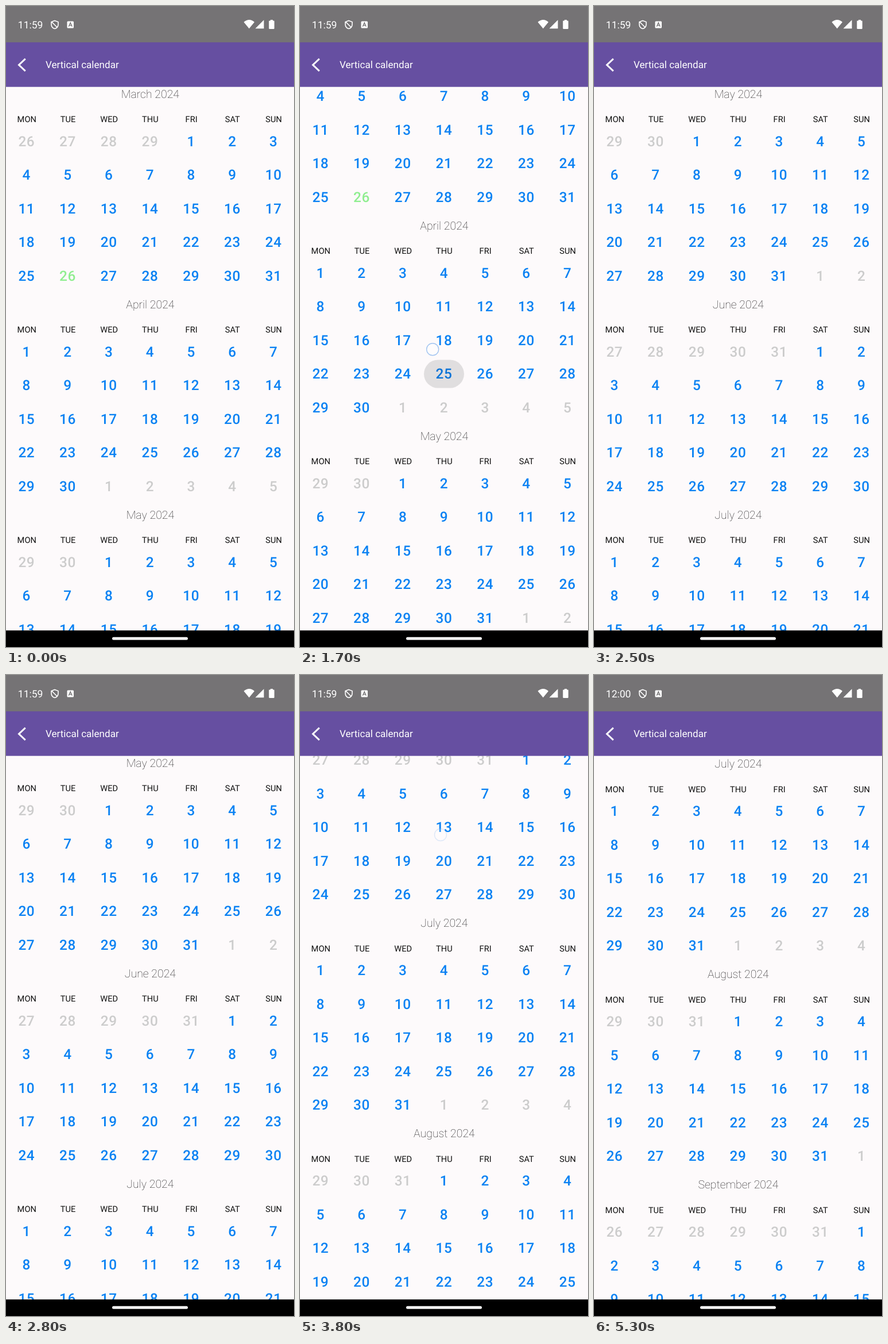
These frames come from a looping animation (502 by 1115 pixels, 6400 ms). An HTML page:

```html
<!DOCTYPE html>
<html lang="en">
<head>
<meta charset="utf-8">
<title>Vertical calendar</title>
<style>
  html, body { margin: 0; width: 100%; height: 100%; overflow: hidden; background: #000; }
  svg { display: block; width: 502px; height: 1115px; }
  text { font-family: Roboto, "Noto Sans", sans-serif; text-rendering: geometricPrecision; }
  #list text { text-anchor: middle; }
  .title { font-size: 19.5px; font-weight: 200; fill: #1c1b1d; }
  .weekday { font-size: 14.64px; fill: #111; }
  .day { font-size: 24.4px; font-weight: 500; letter-spacing: .6px; fill: #0a82f3; }
  .other { fill: #ccc; }
  .today { fill: #90ee90; }
  .label { font-size: 17.08px; fill: #fff; }
  #clock { font-size: 17.5px; font-kerning: none; }
</style>
</head>
<body>
<svg viewBox="0 0 502 1115">
  <rect width="502" height="1115" fill="#fdfafb"/>
  <g id="list">
    <g id="months"></g>
    <rect id="ripple" x="216" y="752.5" width="70" height="49" rx="24.5"/>
  </g>
  <circle id="touch" r="10.5" fill="#fff" fill-opacity=".6" stroke="#9cc1f0" stroke-width="1.4"/>

  <rect width="502" height="64" fill="#757375"/>
  <text id="clock" class="label" x="20.8" y="38.6">11:59</text>
  <g fill="none" stroke="#fff" stroke-width="1.6">
    <path d="M85 25.4 L91 27.7 V32 C91 35.6 88.5 38.6 85 39.6 C81.5 38.6 79 35.6 79 32 V27.7 Z"/>
    <path d="M79.5 27.5 L89.5 37.5"/>
  </g>
  <rect x="106.5" y="26.5" width="11.5" height="12" rx="1.5" fill="#fff"/>
  <path d="M109.3 35.8 L112.25 29 L115.2 35.8 M110.3 33.6 H114.2" fill="none" stroke="#757375" stroke-width="1.4"/>
  <g fill="#fff">
    <path d="M414.5 28 Q424 20 433 28 L423.8 39.3 Z"/>
    <path d="M434.5 39.3 L449.5 24.3 V39.3 Z"/>
    <rect x="461" y="24" width="4" height="3"/>
    <rect x="458.3" y="25.6" width="9.4" height="14.4" rx="1.2"/>
  </g>

  <rect y="63.2" width="502" height="77.5" fill="#664fa1"/>
  <path d="M33.7 91.8 L22.5 102.5 L33.7 113.2" fill="none" stroke="#fff" stroke-width="3"/>
  <text class="label" x="69" y="108">Vertical calendar</text>

  <rect y="1086.2" width="502" height="29" fill="#000"/>
  <rect x="185" y="1097.7" width="132" height="5" rx="2.5" fill="#f5f5f5"/>
</svg>
<script>
  const LOOP = 6400, STEP = 100, MONTH_H = 366, ROW_H = 58.56, COL_W = 502 / 7;
  const byId = id => document.getElementById(id);
  const list = byId('list'), months = byId('months'), ripple = byId('ripple');
  const touch = byId('touch'), clock = byId('clock');

  function setAttrs(el, attrs) {
    for (const name in attrs) el.setAttribute(name, attrs[name]);
  }

  function addText(x, y, cls, str) {
    const el = document.createElementNS('http://www.w3.org/2000/svg', 'text');
    setAttrs(el, { x, y, class: cls });
    el.textContent = str;
    months.append(el);
  }

  function addMonth(index) {
    const month = index + 2, top = index * MONTH_H;
    const first = new Date(2024, month, 1);
    const lead = (first.getDay() + 6) % 7;
    const name = first.toLocaleString('en-US', { month: 'long' });
    addText(251.4, top + 159.8, 'title', name + ' 2024');
    ['MON', 'TUE', 'WED', 'THU', 'FRI', 'SAT', 'SUN'].forEach((label, col) =>
      addText((col + .5) * COL_W + .4, top + 202.2, 'weekday', label));
    for (let i = 0; i < 35; i++) {
      const date = new Date(2024, month, 1 - lead + i);
      const isToday = month === 2 && date.getMonth() === 2 && date.getDate() === 26;
      const kind = date.getMonth() !== month ? ' other' : isToday ? ' today' : '';
      addText((i % 7 + .5) * COL_W, top + 243.65 + Math.floor(i / 7) * ROW_H, 'day' + kind, date.getDate());
    }
  }
  for (let i = 0; i < 7; i++) addMonth(i);

  // The list follows the finger until release, then flings on to its end
  const swipes = [
    { start: 1300, release: 2200, end: 2500, power: 1.2, drag: 362.5, total: 732,
      x: [207, 271], y: [759, 331], opacity: [1, .8] },
    { start: 3000, release: 3800, end: 4200, power: 1.65, drag: 453.5, total: 730.5,
      x: [233, 245], y: [672, 278], opacity: [.6, .32] }
  ];

  const clamp = v => Math.min(1, Math.max(0, v));
  const progress = (t, from, to) => clamp((t - from) / (to - from));
  const mix = ([a, b], p) => a + (b - a) * p;
  const pull = (s, t) => progress(t, s.start, s.release) ** s.power;

  function distance(s, t) {
    const fling = 1 - (1 - progress(t, s.release, s.end)) ** 2;
    return s.drag * pull(s, t) + (s.total - s.drag) * fling;
  }

  function draw(t) {
    const scroll = swipes.reduce((sum, s) => sum + distance(s, t), 0);
    list.setAttribute('transform', `translate(0 ${-scroll})`);
    ripple.setAttribute('opacity', t < swipes[0].start ? 0 : .115 * (1 - progress(t, 1700, 2100)));

    const swipe = swipes.find(s => t >= s.start && t <= s.release);
    touch.setAttribute('visibility', swipe ? 'visible' : 'hidden');
    if (swipe) {
      const p = pull(swipe, t);
      setAttrs(touch, { cx: mix(swipe.x, p), cy: mix(swipe.y, p), opacity: mix(swipe.opacity, p) });
    }
    clock.textContent = t < 5300 ? '11:59' : '12:00';
  }

  const start = performance.now();
  function tick() {
    const t = (performance.now() - start) % LOOP;
    draw(Math.floor(t / STEP) * STEP);
    requestAnimationFrame(tick);
  }
  tick();
</script>
</body>
</html>
```
